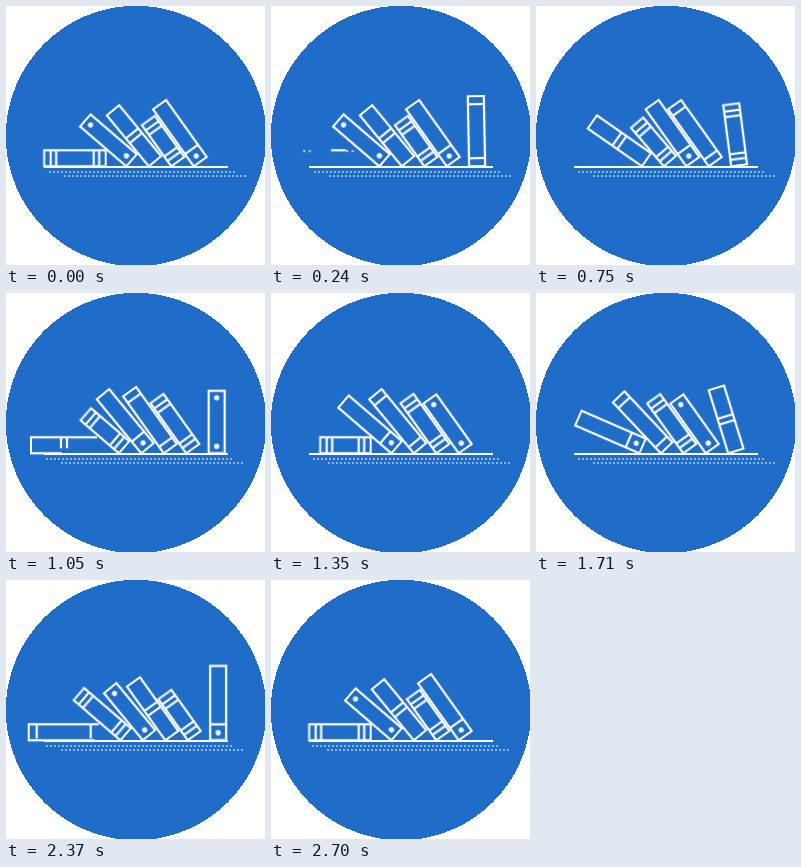
An HTML page that plays this animation: 259 by 259 pixels, repeating every 2730 ms.

```html
<!DOCTYPE html>
<html lang="en">
<head>
<meta charset="utf-8">
<title>Bookshelf loader</title>
<style>
  html, body { margin: 0; width: 100%; height: 100%; overflow: hidden; background: #fff; }
  svg { display: block; width: 100vw; height: 100vh; }
  .disc { fill: #1f6dc9; shape-rendering: crispEdges; }
  .shelf { stroke: #fff; stroke-width: 2; }
  .dots { stroke: #fff; stroke-width: 2.2; stroke-linecap: round; stroke-dasharray: 0 4;
    opacity: .6; animation: drift 120ms linear infinite; }
  .book { fill: none; stroke: #fff; stroke-width: 2.2; }
  .slide, .tilt, .book path, .book circle {
    animation: slide 2700ms linear var(--delay) infinite; }
  .book .tilt { animation-name: tilt; }
  .book path, .book circle { stroke-dasharray: 1.01 1; animation-name: erase; }
  .book .cover { animation-name: erase, recede; }

  @keyframes drift { to { transform: translateX(-4px); } }

  @keyframes slide {
    0% { transform: translate(210.2px, 160.3px); }
    75.8% { transform: translate(108.1px, 160.3px); }
    83.3% { transform: translate(99.8px, 160.3px); }
    90% { transform: translate(89.3px, 160.3px); }
    92.8%, 100% { transform: translate(88px, 160.3px); }
  }

  /* pop up, then fall over in four steps */
  @keyframes tilt {
    0%, .5% { transform: rotate(0deg) scaleY(0); animation-timing-function: ease-out; }
    4% { transform: rotate(0deg) scaleY(1.08); }
    6.3% { transform: rotate(0deg) scaleY(1); }
    8.2% { transform: rotate(0deg) scaleY(1); animation-timing-function: cubic-bezier(.4, .12, .75, .65); }
    16.6% { transform: rotate(-35.5deg) scaleY(1); }
    45.8% { transform: rotate(-35.5deg) scaleY(1); animation-timing-function: cubic-bezier(.4, .12, .75, .65); }
    50% { transform: rotate(-39.5deg) scaleY(1); }
    59.7% { transform: rotate(-39.5deg) scaleY(1); animation-timing-function: cubic-bezier(.4, .12, .75, .65); }
    66.6% { transform: rotate(-49.3deg) scaleY(1); }
    75.8% { transform: rotate(-49.3deg) scaleY(1); animation-timing-function: cubic-bezier(.4, .12, .75, .65); }
    83.3%, 100% { transform: rotate(-90deg) scaleY(1); }
  }

  @keyframes erase {
    0%, 87.1% { stroke-dasharray: 1.01 1; }
    92.8%, 100% { stroke-dasharray: 0 1; }
  }

  @keyframes recede {
    0%, 88.9% { stroke-dashoffset: 0; }
    92.8%, 100% { stroke-dashoffset: -.1; }
  }
</style>
</head>
<body>
<svg viewBox="0 0 259 259">
  <circle class="disc" cx="130" cy="130" r="130.2"/>
  <path class="dots" d="M44 166H228.1"/>
  <path class="dots" d="M59 170H239.1"/>
  <path class="shelf" d="M38 161H222"/>
  <g id="books"></g>
</svg>
<script>
  const WIDTH = 16, STEP = 450, LOOP = 2730;

  // lines and dots are distances from the foot of the book
  const books = [
    { height: 61.5, lines: [6.5, 12, 49.5, 55] },
    { height: 61, dots: [6.8, 54.2] },
    { height: 66, lines: [30, 36] },
    { height: 50.5, lines: [6.5, 12, 38.5, 44] },
    { height: 70, lines: [15], dots: [7] },
    { height: 70, lines: [8, 62] }
  ];

  const path = (d, name = 'line') => `<path class="${name}" pathLength="1" d="${d}"/>`;
  const line = y => path(`M${WIDTH} ${-y}H0`);
  const dot = y => `<circle pathLength="1" cx="${WIDTH / 2}" cy="${-y}" r="1.5"/>`;

  document.getElementById('books').innerHTML = books.map(
    ({ height, lines = [], dots = [] }, i) => `
      <g class="book" style="--delay:${(i - 5) * STEP}ms"><g class="slide"><g class="tilt">
        ${path(`M${WIDTH} 0V${-height}H0V0Z`, 'cover')}
        ${lines.map(line).join('')}${dots.map(dot).join('')}
      </g></g></g>`
  ).join('');

  // the first pose shows again for a moment before the loop restarts
  const animations = document.getAnimations();
  animations.forEach(a => a.pause());

  function draw() {
    const time = performance.now() % LOOP;
    animations.forEach(a => { a.currentTime = time; });
    requestAnimationFrame(draw);
  }
  draw();
</script>
</body>
</html>
```
